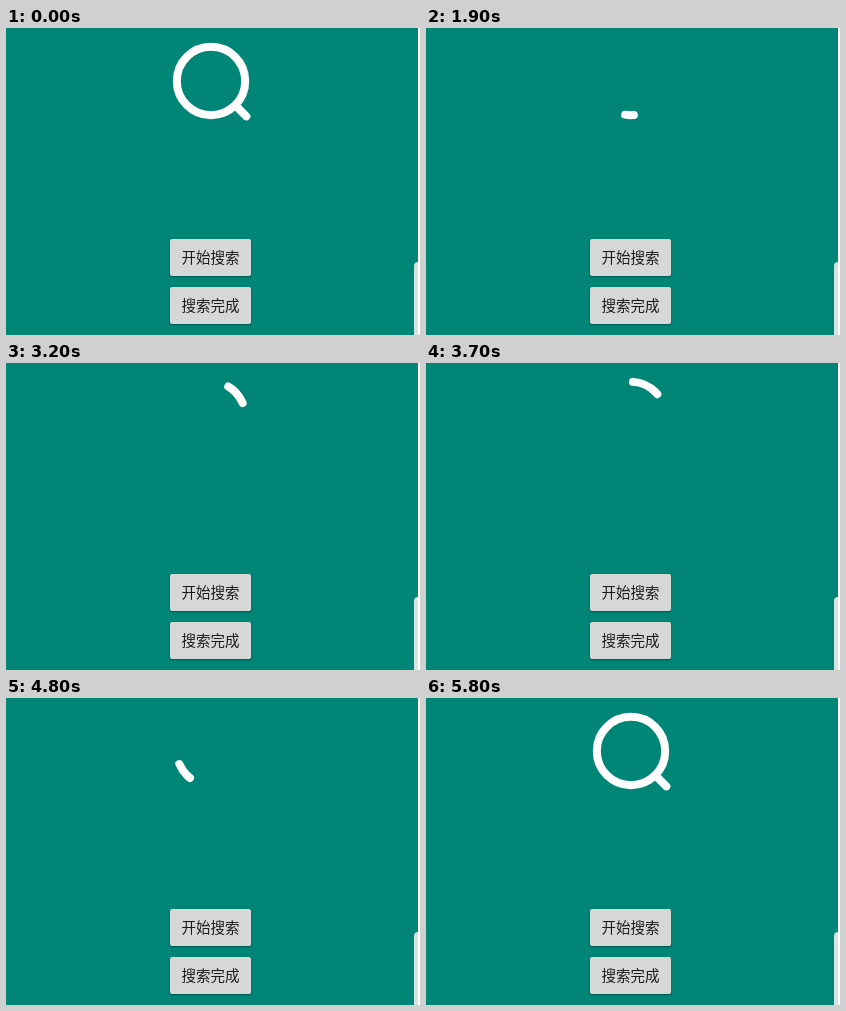
Recreate the animation shown at these times as an HTML page. Size 414 px wide and 307 px high, loop 7200 ms.

```html
<!DOCTYPE html>
<html lang="zh">
<head>
<meta charset="utf-8">
<title>搜索</title>
<style>
  html, body { margin: 0; width: 100%; height: 100%; overflow: hidden; background: #008577; }
  svg { position: absolute; left: 0; top: 0; display: block; }
  path { fill: none; stroke: #fff; stroke-width: 8; stroke-linecap: round; }
  .button {
    position: absolute; left: 164px; width: 81px; height: 37px;
    border-radius: 2px; background: #d6d7d7; color: #1c1c1c;
    box-shadow: 0 1px 2px rgba(0, 0, 0, .38);
    font: 14.5px/36px "Noto Sans CJK SC", "Noto Sans CJK", sans-serif;
    text-align: center; white-space: nowrap; overflow: hidden;
  }
  .panel {
    position: absolute; left: 408px; top: 234px; width: 4px; height: 73px;
    border-radius: 4px 0 0 0; background: #d5e4e1;
  }
  .edge { position: absolute; left: 412px; top: 0; width: 2px; height: 307px; background: #fff; }
</style>
</head>
<body>
<svg width="414" height="307">
  <path id="glass"/>
  <path id="ring"/>
</svg>
<div class="button" id="start" style="top:211px">开始搜索</div>
<div class="button" id="finish" style="top:259px">搜索完成</div>
<div class="panel"></div>
<div class="edge"></div>
<script>
const LOOP = 7200, STEP = 100, RUN = 400;
const CX = 205, CY = 53, RADIUS = 34.2, HANDLE = 50;
const OPEN = 1094, CLOSE = 5420;
const SPINS = [1588, 2082, 2579, 3055, 3535, 4032, 4528, 4976];
const TRAIL = 77;

const get = id => document.getElementById(id);
const glass = get('glass'), ring = get('ring');

function point(degrees, radius = RADIUS) {
  const a = degrees * Math.PI / 180;
  return `${CX + radius * Math.cos(a)} ${CY + radius * Math.sin(a)}`;
}

// Nearly full circle beginning at 45 degrees; sweep 1 is clockwise.
function circle(sweep) {
  const arc = angle => `A${RADIUS} ${RADIUS} 0 0 ${sweep} ${point(angle)}`;
  return `M${point(45)}${arc(225)}${arc(sweep ? 44.9 : 45.1)}`;
}

glass.setAttribute('d', `${circle(1)}L${point(45, HANDLE)}`);
ring.setAttribute('d', circle(0));
const glassLength = glass.getTotalLength(), ringLength = ring.getTotalLength();

function showSegment(path, from, to, total) {
  const length = to - from;
  path.style.display = length > 0.01 ? '' : 'none';
  path.style.strokeDasharray = `${length} ${total * 2}`;
  path.style.strokeDashoffset = -from;
}

function progress(t, begin) {
  const u = Math.min(1, Math.max(0, (t - begin) / RUN));
  return (1 - Math.cos(Math.PI * u)) / 2;
}

function press(button, t, begin) {
  const age = t - begin;
  const grey = age < 0 || age >= 200 ? '#d6d7d7' : age < 100 ? '#c4c4c4' : '#cecece';
  button.style.background = grey;
}

function draw(time) {
  const t = Math.floor(time % LOOP / STEP) * STEP;

  let hidden = 0;
  if (t >= 1200) hidden = t < CLOSE ? progress(t, OPEN) : 1 - progress(t, CLOSE);
  if (t >= 5800) hidden = 0;
  showSegment(glass, glassLength * hidden, glassLength, glassLength);

  const spin = SPINS.filter(begin => begin <= t).pop() ?? LOOP;
  const v = progress(t, spin), head = ringLength * v;
  showSegment(ring, head - Math.min(v, 1 - v) * TRAIL, head, ringLength);

  press(get('start'), t, 1200);
  press(get('finish'), t, 5300);
  get('finish').style.boxShadow =
    t >= 5200 && t < 5500 ? '0 2px 4px rgba(0,0,0,.5)' : '';
}

function frame() {
  draw(performance.now());
  requestAnimationFrame(frame);
}
frame();
</script>
</body>
</html>
```
